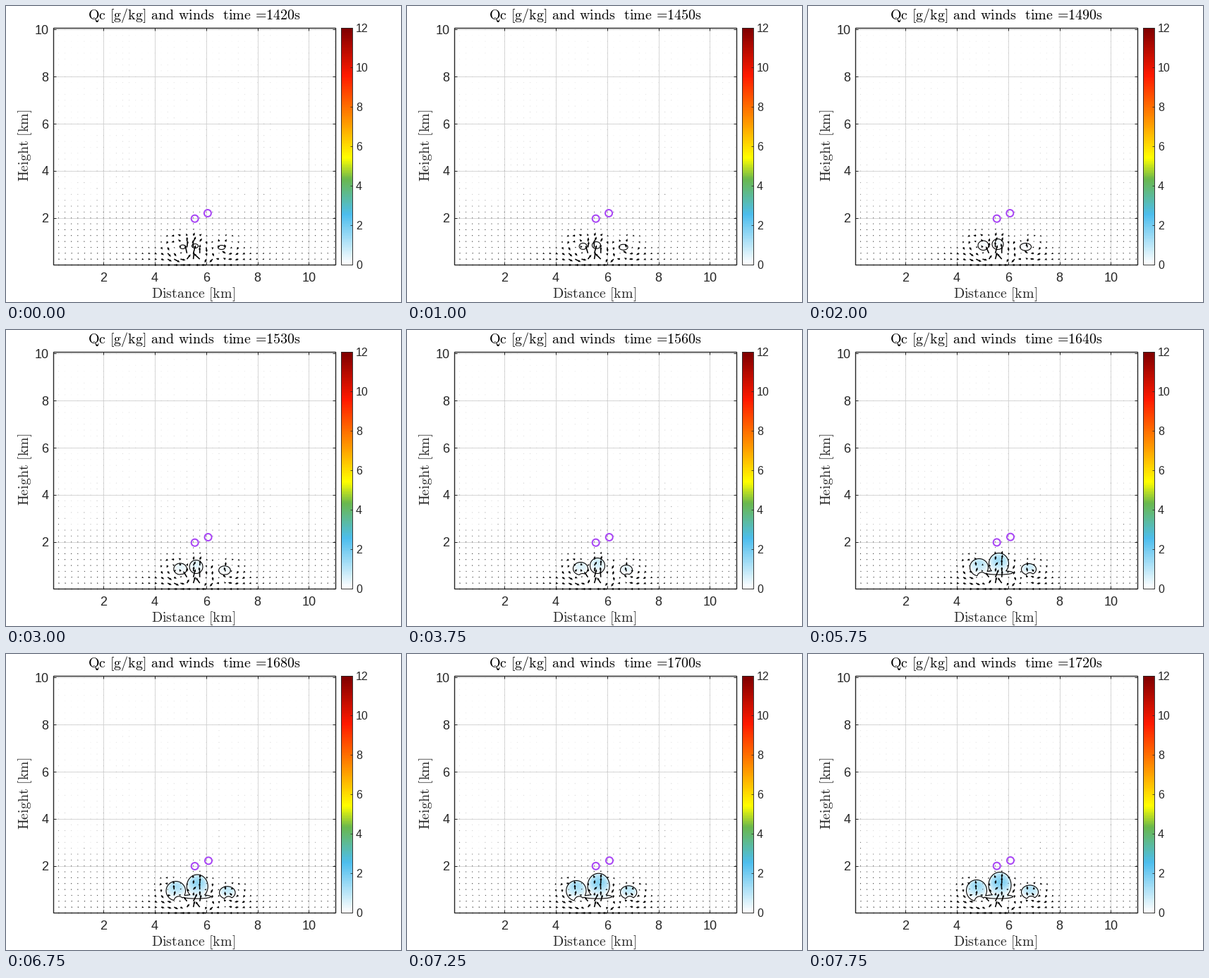
Recreate the animation shown at these times as a matplotlib script. Size 560 px wide and 420 px high, loop 8 s.

```python
import numpy as np
import matplotlib.pyplot as plt
from matplotlib.animation import FuncAnimation
from matplotlib.colors import LinearSegmentedColormap
from matplotlib.patches import Circle, Rectangle

W, H, DPI = 560, 420, 100
PX = 72 / DPI
LEFT, RIGHT, TOP, BOTTOM = 67, 467, 31, 367
INK = "#262626"

plt.rcParams["mathtext.fontset"] = "cm"
plt.rcParams["font.family"] = "Liberation Sans"

fig = plt.figure(figsize=(W / DPI, H / DPI), dpi=DPI, facecolor="white")
ax = fig.add_axes([0, 0, 1, 1])
ax.set_xlim(0.5, W + 0.5)
ax.set_ylim(H - 0.5, -0.5)
ax.axis("off")


def px(km):
    return 65.9 + 36.4 * km


def py(km):
    return 367 - 33.4 * km


def roman(text):
    """Upright serif maths text with plain word spacing."""
    text = text.replace("=", r"\hspace{-0.2}=\hspace{-0.2}")
    return r"$\mathrm{" + text.replace(" ", r"\hspace{0.38}") + "}$"


def line(x, y, color=INK, width=1.0, z=5):
    ax.plot(x, y, color=color, lw=width * PX, zorder=z, solid_capstyle="butt")


def label(x, y, text, size, ha="center", va="baseline", **kw):
    return ax.text(x, y, text, fontsize=size * PX, ha=ha, va=va, **kw)


# Plot frame, grid and tick labels
for km in range(2, 11, 2):
    x, y = px(km), py(km)
    line([x, x], [TOP, BOTTOM], "#d6d6d6", z=1)
    line([LEFT, RIGHT], [y, y], "#d6d6d6", z=1)
    for a, b in ((BOTTOM, BOTTOM - 4), (TOP, TOP + 4)):
        line([x, x], [a, b])
    for a, b in ((LEFT, LEFT + 4), (RIGHT, RIGHT - 4)):
        line([a, b], [y, y])
    label(x, 391, str(km), 18, color=INK)
    label(61, y + 6.5, str(km), 18, ha="right", color=INK)
ax.add_patch(Rectangle((LEFT, TOP), RIGHT - LEFT, BOTTOM - TOP, fill=False,
                       ec=INK, lw=1.4 * PX, zorder=5))
label(266.5, 414, roman("Distance [km]"), 19.9, color=INK)
label(40, 197.5, roman("Height [km]"), 19.9, ha="right", va="center",
      rotation=90, color=INK)
title = label(116, 19, "", 20, ha="left")

# Colour bar
cmap = LinearSegmentedColormap.from_list("qc", [
    (0, "white"), (0.21, "#4dbeee"), (0.36, "#6ab84e"), (0.45, "#ffff00"),
    (0.6, "#ff9900"), (0.8, "#ff1a00"), (1, "#800000")], N=256)
ax.imshow(np.linspace(1, 0, 336)[:, None], cmap=cmap, aspect="auto",
          extent=(475, 491, BOTTOM, TOP), zorder=2)
ax.add_patch(Rectangle((475, TOP), 16, BOTTOM - TOP, fill=False, ec=INK,
                       lw=0.9 * PX, zorder=5))
for q in range(0, 13, 2):
    y = BOTTOM - 28 * q
    line([488, 491], [y, y], width=0.8)
    label(496.5, y + 5.7, str(q), 16, ha="left", color=INK)

# Clouds: centre, half width, top and bottom at the key times
KEYS = [1420, 1490, 1560, 1640, 1720]
CLOUDS = {
    "left": ([251, 249, 246.5, 243, 239.5], [4, 7.5, 10.5, 13, 14.5],
             [338.5, 332.5, 329, 324, 320], [344, 346, 347, 348.5, 350]),
    "mid": ([268.5, 269.5, 270.5, 271, 272.5], [4.5, 8, 10.5, 14, 16],
            [337, 330, 323, 316, 309], [343, 345, 345, 346, 346]),
    "right": ([306, 309, 311.5, 313.5, 315], [5, 8, 8.5, 10.5, 12],
              [339, 336, 333, 331, 327.5], [345, 346.5, 347, 347, 347]),
}
SKY = (200, 340, 367, 297)
gx, gy = np.meshgrid(np.arange(200.25, 340, 0.5), np.arange(297.25, 367, 0.5))


def cloud_at(name, t):
    return [np.interp(t, KEYS, track) for track in CLOUDS[name]]


def oval(cx, cy, rx, ry):
    return 1 - ((gx - cx) / rx) ** 2 - ((gy - cy) / ry) ** 2


def cloud_field(t):
    """Positive inside the clouds, zero on their outline."""
    grown = np.clip((t - 1490) / 110, 0, 1)
    parts = []
    for name, offset, share in (("left", 0.3, 0.5), ("mid", 0, 0),
                                ("right", 0.15, 0.5)):
        cx, rx, top, bottom = cloud_at(name, t)
        ry = (bottom - top) / 2
        body = oval(cx, top + ry, rx, ry)
        if share and grown > 0:
            notch = oval(cx + offset * rx, bottom + 1, share * rx,
                         0.1 + 0.5 * ry * grown)
            body = np.minimum(body, -notch)
        parts.append(body)
    skirt = np.clip((t - 1570) / 70, 0, 1)
    if skirt > 0:
        parts.append(oval(270.5, 343.8, 20.5 * skirt, 2.8))
    return np.max(parts, axis=0)


def cloud_image(field, t):
    strength = np.interp(t, KEYS, [0.1, 0.35, 0.85, 1.3, 1.65])
    lift = np.clip((350 - gy) / 22, 0, 1.15)
    rgba = cmap(np.clip(field, 0, 1) ** 0.6 * strength * lift / 12)
    rgba[..., 3] = field > 0
    return rgba


shade = ax.imshow(np.zeros(gx.shape + (4,)), extent=SKY, aspect="auto",
                  interpolation="nearest", zorder=2)

# Wind arrows on a 250 m mesh
rng = np.random.default_rng(4)
kx, ky = (a.ravel() for a in np.meshgrid(np.arange(1, 45) / 4,
                                         np.arange(0, 41) / 4))
gust_u, gust_v = rng.normal(size=(2, kx.size))
phase = rng.uniform(0, 2 * np.pi, kx.size)
column_tone = rng.uniform(0.3, 1, 44)[np.arange(kx.size) % 44]


def vortex(x0, y0, a, b, speed):
    """Overturning cell with a rising core, speeds in pixels."""
    dx, dy = kx - x0, ky - y0
    core = speed * np.exp(-(dx / a) ** 2 - (dy / b) ** 2)
    return 2 * dx * dy / b ** 2 * core, (1 - 2 * (dx / a) ** 2) * core


def wind(t):
    u, v = vortex(5.7, 0.85, 1.7, 0.75, 2.2)
    cells = [(5.5, 0.3, 0.55, 0.4, 10)]
    for name, speed in (("left", 8), ("mid", 9), ("right", 6.5)):
        cx, _, top, bottom = cloud_at(name, t)
        height = (367 - (top + bottom) / 2) / 33.4
        cells.append(((cx - 65.9) / 36.4, height, 0.48, 0.48, speed))
    for cell in cells:
        du, dv = vortex(*cell)
        u, v = u + du, v + dv
    rough = np.exp(-((kx - 5.7) / 1.1) ** 2 - ((ky - 0.5) / 0.5) ** 2)
    u = u + 2.6 * rough * (gust_u + 0.4 * np.sin(t / 45 + phase))
    v = v + 2.0 * rough * gust_v
    u = u + 1.7 * np.exp(-(ky / 1.7) ** 2) * np.sign(5.7 - kx)
    v = np.where(ky == 0, 0, v)
    cap = np.minimum(1, 12 / np.maximum(np.hypot(u, v), 1e-6))
    return u * cap, -v * cap


def tones(t, speed):
    """Dots fade with height and flicker slowly aloft."""
    alpha = np.interp(ky, [0, 1.4, 2, 2.8, 3.6, 5, 10],
                      [1, 0.95, 0.75, 0.5, 0.28, 0.15, 0.07])
    flicker = 0.6 + 0.4 * np.sin(t / 30 + phase)
    alpha = np.where(ky > 2.6, alpha * column_tone * flicker * 1.5, alpha)
    alpha = np.where(speed > 3, 1, alpha)
    rgba = np.zeros((kx.size, 4))
    rgba[:, 3] = np.clip(alpha, 0, 1)
    return rgba


arrows = ax.quiver(px(kx), py(ky), np.zeros(kx.size), np.zeros(kx.size),
                   angles="xy", units="xy", scale_units="xy", scale=1,
                   width=1.6, headwidth=2, headlength=2.2,
                   headaxislength=2.2, minlength=0.8, zorder=6)

rings = [Circle((0, 0), 5, fill=False, ec="#a845f5", lw=2 * PX, zorder=7)
         for _ in range(2)]
for ring in rings:
    ax.add_patch(ring)

outline = None


def update(frame):
    global outline
    t = 1420 + 10 * max(frame - 1, 0)
    title.set_text(roman(f"Qc [g/kg] and winds  time ={t}s"))

    field = cloud_field(t)
    shade.set_data(cloud_image(field, t))
    if outline is not None:
        outline.remove()
    outline = ax.contour(gx, gy, field, [0], colors="black",
                         linewidths=1.1 * PX, zorder=4)

    u, v = wind(t)
    arrows.set_UVC(u, v)
    arrows.set_facecolor(tones(t, np.hypot(u, v)))

    rise = np.interp(t, [1600, 1720], [0, 1])
    rings[0].center = (268.2, 301.2 - rise)
    rings[1].center = (np.interp(t, [1420, 1600], [286.4, 287.5]),
                       293.5 - rise)
    return []


anim = FuncAnimation(fig, update, frames=32, interval=250, repeat=True,
                     init_func=lambda: [])
plt.show()
```
